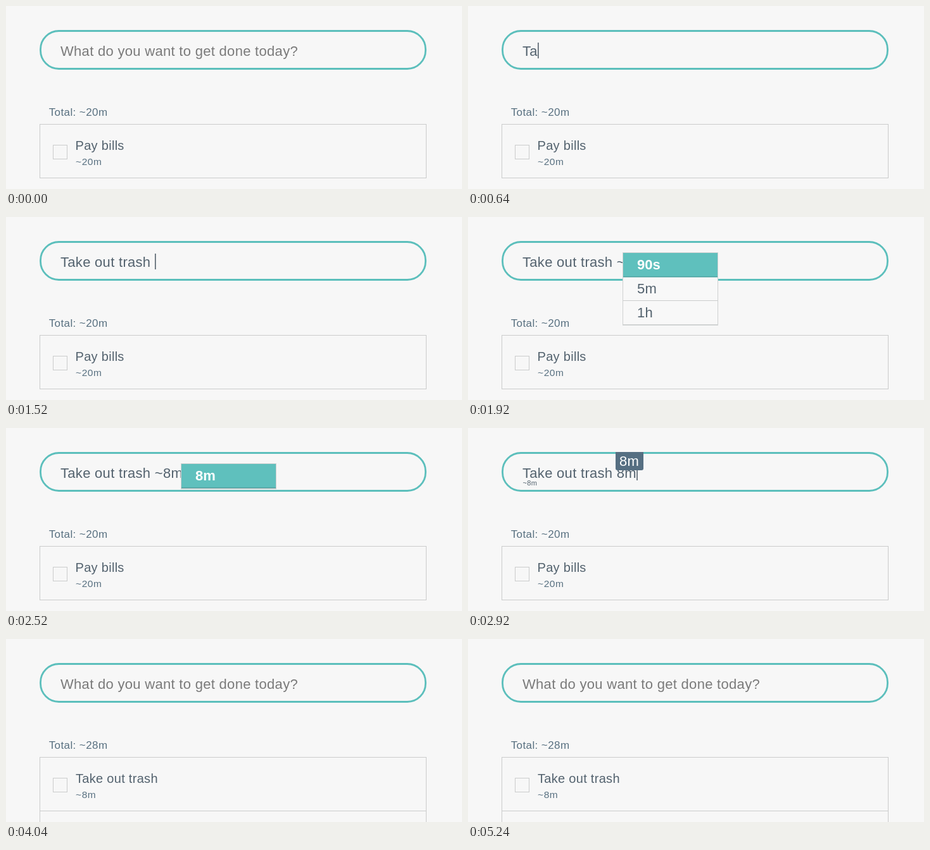
Animation of 720 by 290 pixels, one loop 5360 ms. Source, as an HTML page:

```html
<!DOCTYPE html>
<html lang="en">
<head>
<meta charset="utf-8">
<title>Task entry</title>
<style>
  html, body { margin: 0; width: 100%; height: 100%; overflow: hidden; background: #f7f7f7; }
  svg { display: block; width: 100%; height: 100%; }
  text { font-family: "Liberation Sans", Arial, sans-serif; letter-spacing: .3px; white-space: pre; fill: #53626e; }
  .entry { font-size: 22px; }
  .placeholder { fill: #7a7a7a; }
  .total { font-size: 17px; letter-spacing: .4px; fill: #587080; }
  .title { font-size: 20px; }
  .time { font-size: 15.5px; letter-spacing: .6px; fill: #587080; }
  .estimate { font-size: 11px; }
  .active { font-weight: bold; letter-spacing: 0; fill: #fff; }
  .line { fill: none; stroke: #cbcccc; }
  .panel { fill: #f8f8f8; stroke: #cfd1d1; }
</style>
</head>
<body>
<svg viewBox="0 0 720 290">
  <defs>
    <clipPath id="reveal"><rect id="revealBox" x="50" y="187" width="620" height="0"/></clipPath>
    <g id="frame" class="line">
      <rect x="53.5" y="187.5" width="610" height="85"/>
      <rect x="74.5" y="220.5" width="22" height="22"/>
    </g>
  </defs>

  <rect x="54.5" y="39.5" width="608" height="60" rx="29" fill="#f7f7f7" stroke="#5cbfbc" stroke-width="2.8"/>
  <text id="placeholder" class="entry placeholder" x="86" y="79">What do you want to get done today?</text>
  <text id="entry" class="entry" x="86" y="79"></text>
  <rect id="caret" y="58" width="1.5" height="25" fill="#4b5863"/>
  <text id="estimate" class="estimate" x="86.5" y="91">~8m</text>

  <text id="total" class="total" x="67.7" y="174"></text>
  <g id="newTask" clip-path="url(#reveal)">
    <use href="#frame"/>
    <text class="title" x="110" y="228">Take out trash</text>
    <text class="time" x="110" y="252">~8m</text>
  </g>
  <g id="oldTask">
    <use href="#frame"/>
    <text class="title" x="109.5" y="228">Pay bills</text>
    <text class="time" x="110" y="252">~20m</text>
  </g>

  <g id="menu">
    <rect id="menuShadow" x="0" width="151" height="2" fill="#d2d4d4"/>
    <rect id="menuPanel" class="panel" x=".5" y="56.5" width="150"/>
    <rect x="1" y="57" width="149" height="38" fill="#5fc0bd"/>
    <rect x="1" y="94" width="149" height="1.5" fill="#48a19f"/>
    <text id="choice" class="entry active" x="23" y="83"></text>
    <g id="moreChoices">
      <path class="line" d="M1 132.5H150"/>
      <text class="entry" x="23" y="121">5m</text>
      <text class="entry" x="23" y="159">1h</text>
    </g>
  </g>

  <g id="badge">
    <path d="M233 38H277V64a3 3 0 0 1-3 3H236a3 3 0 0 1-3-3Z" fill="#566f82"/>
    <text class="entry" x="239" y="60" style="fill:#fff">8m</text>
  </g>
</svg>
<script>
  const LOOP = 5360;
  const OPEN = 1760, FILTER = 2280, UNIT = 2440, PICK = 2920, SUBMIT = 3480;
  const $ = id => document.getElementById(id);
  const clamp = v => Math.max(0, Math.min(1, v));
  const ramp = (t, from, to) => clamp((t - from) / (to - from));
  const show = (id, on) => $(id).setAttribute("visibility", on ? "inherit" : "hidden");
  const set = (id, attrs) => {
    for (const name in attrs) $(id).setAttribute(name, attrs[name]);
  };

  // Characters of a phrase typed by time t.
  const typed = (phrase, t, start, step) =>
    t < start ? "" : phrase.slice(0, Math.floor((t - start) / step) + 1);

  function entryText(t) {
    if (t >= SUBMIT) return "";
    if (t >= PICK) return "Take out trash 8m";
    return typed("Take out ", t, 560, 60) + typed("trash ", t, 1120, 80) +
      (t >= OPEN ? "~" : "") + (t >= FILTER ? "8" : "") + (t >= UNIT ? "m" : "");
  }

  function drawMenu(t) {
    const filtered = t >= FILTER;
    const height = filtered ? 39 : 114;
    const left = t >= UNIT ? 276 : filtered ? 257 : 244;
    show("menu", t >= OPEN && t < PICK);
    show("moreChoices", !filtered);
    set("menu", { transform: `translate(${left} 0)`, opacity: ramp(t, OPEN - 40, 1880) });
    set("menuPanel", { height });
    set("menuShadow", { y: 56 + height });
    $("choice").textContent = filtered ? "8m" : "90s";
  }

  function draw(t) {
    const text = entryText(t);
    const submitted = t >= SUBMIT;
    const picked = t >= PICK && !submitted;
    $("entry").textContent = text;
    show("placeholder", !text);

    const width = text ? $("entry").getComputedTextLength() : 0;
    set("caret", { x: 86.3 + width });
    show("caret", (t >= 320 && t < 4040) || (t >= 4640 && t < 5240));

    drawMenu(t);
    show("estimate", picked);
    show("badge", picked);
    set("badge", { opacity: 1 - ramp(t, 2980, 3200) });

    const slide = 85 * (1 - (1 - ramp(t, SUBMIT - 20, 3800)) ** 2);
    const shift = submitted ? slide : 0;
    $("total").textContent = submitted ? "Total: ~28m" : "Total: ~20m";
    show("newTask", submitted);
    set("revealBox", { height: shift });
    set("oldTask", { transform: `translate(0 ${shift})` });
  }

  const began = performance.now();
  function tick() {
    draw((performance.now() - began) % LOOP);
    requestAnimationFrame(tick);
  }
  tick();
</script>
</body>
</html>
```
